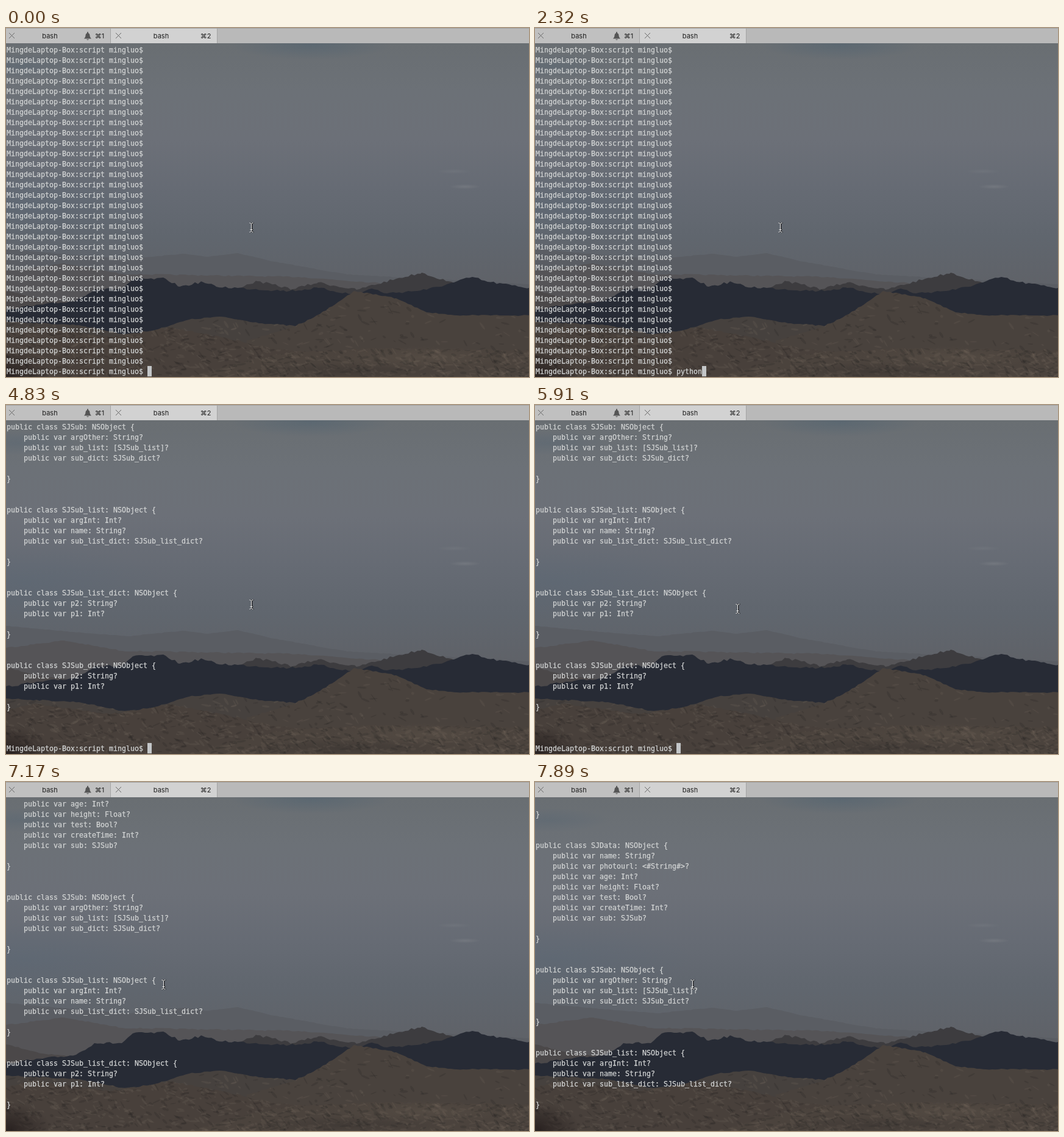
Write an HTML page with a canvas that moves like this. It is 858 px wide and 572 px high and loops after 8000 ms.

```html
<!DOCTYPE html>
<html lang="en">
<head>
<meta charset="utf-8">
<title>Terminal</title>
<style>
html, body { margin: 0; width: 100%; height: 100%; overflow: hidden; background: #666b72; }
#stage { position: relative; width: 858px; height: 572px; overflow: hidden; }
#stage > * { position: absolute; }
canvas { left: 0; top: 0; }
#text { margin: 0; left: 1px; top: 28px; color: #d2d4d4; white-space: pre;
  font: 11.63px/17px "DejaVu Sans Mono", monospace; -webkit-text-stroke: .25px #d2d4d4; }
#caret { width: 7px; height: 17px; background: #c3c6c8; }
#mouse { left: 0; top: 0; overflow: visible; fill: none; }
#bar { left: 0; top: 0; width: 858px; height: 25px; background: #b9b9b9; box-sizing: border-box;
  border-top: 1px solid #a2a2a2; }
.tab { position: absolute; top: 0; height: 24px; box-sizing: border-box; background: #c0c0c0;
  border-right: 1px solid #a4a4a4; color: #1c1c1c; font: 11px/24px Inter, "DejaVu Sans", sans-serif; }
.tab.on { background: #d2d2d2; }
.tab span { position: absolute; transform: translateX(-50%); white-space: pre; }
.tab svg { position: absolute; left: 0; top: 0; }
</style>
</head>
<body>
<div id="stage">
  <canvas id="scene" width="858" height="572"></canvas>
  <pre id="text"></pre>
  <div id="caret"></div>
  <div id="bar">
    <div class="tab" style="left:0;width:172px">
      <svg width="172" height="22"><path d="M5 7l9 9m0-9l-9 9" stroke="#6a6a6a"/>
      <path d="M128 16.5q2.5-2 2.5-5q0-4 3.5-4.5q3.5.5 3.5 4.5q0 3 2.5 5zM132 17.5h4q-2 2.5-4 0zM133 5.5h2v2h-2z" fill="#555"/></svg>
      <span style="left:72px">bash</span><span style="left:153.5px">⌘1</span>
    </div>
    <div class="tab on" style="left:172px;width:175px">
      <svg width="172" height="22"><path d="M8 7l9 9m0-9l-9 9" stroke="#6a6a6a"/></svg>
      <span style="left:82.5px">bash</span><span style="left:155.5px">⌘2</span>
    </div>
  </div>
  <svg id="mouse" width="1" height="1">
    <g id="beam">
      <path d="M-2-7.5q3 0 3 2V5.5q0 2-3 2M4-7.5q-3 0-3 2M4 7.5q-3 0-3-2M-1 3.5h4" stroke="#18191b" stroke-width="1.6"/>
      <path d="M-3-7.5q3 0 3 2V5.5q0 2-3 2M3-7.5q-3 0-3 2M3 7.5q-3 0-3-2M-2 3.5h4" stroke="#eee"/>
    </g>
  </svg>
</div>
<script>
const $ = id => document.getElementById(id);
const ctx = $('scene').getContext('2d');

let seed = 7;
const rnd = () => (seed = seed * 16807 % 2147483647) / 2147483647;

function sky() {
  const g = ctx.createLinearGradient(0, 24, 0, 420);
  ['#696e72', '#6c7177', '#6c7078', '#666b74', '#60666e', '#5f6268']
    .forEach((c, i, all) => g.addColorStop(i / (all.length - 1), c));
  ctx.fillStyle = g;
  ctx.fillRect(0, 24, 858, 548);
}

function glow(x, y, rx, ry, rgb, alpha) {
  ctx.save();
  ctx.translate(x, y);
  ctx.scale(rx, ry);
  const g = ctx.createRadialGradient(0, 0, 0, 0, 0, 1);
  g.addColorStop(0, `rgba(${rgb},${alpha})`);
  g.addColorStop(1, `rgba(${rgb},0)`);
  ctx.fillStyle = g;
  ctx.fillRect(-1, -1, 2, 2);
  ctx.restore();
}

// Filled ridge through a few "x,y" peaks and dips, roughened by noise, with rock specks
function ridge(points, color, rough, specks = 0) {
  const p = points.split(' ').map(s => s.split(',').map(Number));
  const top = Math.min(...p.map(q => q[1]));
  ctx.save();
  ctx.beginPath();
  ctx.moveTo(p[0][0], 572);
  p.forEach(([x, y], i) => {
    ctx.lineTo(x, y);
    const [nx, ny] = p[i + 1] || [x, y];
    for (let d = 5; d < nx - x; d += 5)
      ctx.lineTo(x + d, y + (ny - y) * d / (nx - x) + (rnd() - .5) * rough);
  });
  ctx.lineTo(p[p.length - 1][0], 572);
  ctx.fillStyle = color;
  ctx.fill();
  ctx.clip();
  for (let i = 0; i < specks; i++) {
    ctx.fillStyle = rnd() < .5 ? 'rgba(125,112,98,.16)' : 'rgba(28,26,28,.17)';
    ctx.beginPath();
    ctx.ellipse(rnd() * 858, top + rnd() * (572 - top), 2 + rnd() * 6, .7 + rnd() * 1.6, rnd() * 1.6 - .5, 0, 7);
    ctx.fill();
  }
  ctx.restore();
}

function landscape() {
  sky();
  glow(500, 28, 130, 24, '75,96,112', .45);
  glow(20, 62, 100, 20, '85,100,114', .4);
  glow(30, 290, 230, 60, '84,101,117', .3);
  glow(735, 235, 28, 4, '130,134,140', .25);
  glow(753, 260, 26, 4, '135,138,143', .4);
  ridge('0,362 110,372 200,379 290,370 330,375 380,369 440,383 560,404 858,420', '#5a5d63', 1);
  ridge('0,398 95,386 190,403 480,408 640,420', '#555457', 2);
  ridge('0,430 60,445 110,450', '#4b4849', 2);
  ridge('380,426 412,415 470,428 512,417 575,429 640,411 682,401 725,415 760,430', '#3d3c3f', 4);
  ridge('0,461 115,447 145,428 190,428 208,412 262,411 285,424 322,416 345,424 465,431 512,426 570,437 600,427 625,435 690,429 735,417 765,408 790,416 858,426', '#272b35', 4);
  ridge('0,481 120,487 190,501 230,499 300,478 350,473 420,484 520,492', '#46413e', 2, 500);
  ridge('395,512 465,492 500,477 540,453 572,431 640,443 690,466 740,471 858,471', '#49423d', 2, 500);
  ridge('0,500 50,490 170,507 270,491 350,506 440,526 600,545', '#48403b', 3, 1100);
  ridge('300,572 400,545 460,532 600,525 858,528', '#4b433d', 3, 900);
  glow(680, 540, 150, 18, '105,94,82', .25);
  glow(560, 562, 170, 14, '45,41,40', .35);
  glow(0, 572, 75, 48, '36,29,28', .9);
}

const prompt = 'MingdeLaptop-Box:script mingluo$ ';
const command = 'python Main.py ';
const cls = (name, ...vars) =>
  [`public class ${name}: NSObject {`, ...vars.map(v => `    public var ${v}?`), '', '}', '', ''];
const output = ['', '}', '', '',
  ...cls('SJData', 'name: String', 'photourl: <#String#>', 'age: Int', 'height: Float',
    'test: Bool', 'createTime: Int', 'sub: SJSub'),
  ...cls('SJSub', 'argOther: String', 'sub_list: [SJSub_list]', 'sub_dict: SJSub_dict'),
  ...cls('SJSub_list', 'argInt: Int', 'name: String', 'sub_list_dict: SJSub_list_dict'),
  ...cls('SJSub_list_dict', 'p2: String', 'p1: Int'),
  ...cls('SJSub_dict', 'p2: String', 'p1: Int'), '', prompt];

const rows = 32, tick = 180;
const complete = 4110, enter = 4650, print = 4830, scrollStart = 6630;
const keys = [1070, 1250, 1430, 1430, 2140, 2320, 3040, 3930];
const pointer = [[0, 402.5, 327], [5910, 332.5, 334], [6090, 259, 335], [6450, 258.5, 332]];

const typed = t => t < complete ? keys.filter(k => k <= t).length : command.length;

function scrolled(t) {
  const step = Math.floor((t - scrollStart) / tick);
  return step < 0 ? 0 : Math.min(16, Math.round(2 + 2.2 * step));
}

function screen(t) {
  if (t >= print) {
    const end = output.length - scrolled(t);
    return output.slice(end - rows, end);
  }
  const lines = Array(rows).fill(prompt);
  const line = prompt + command.slice(0, typed(t));
  if (t < enter) lines[rows - 1] = line;
  else lines.splice(rows - 2, 2, line, '');
  return lines;
}

let shown;
function frame(now) {
  const t = now % 8000;
  const lines = screen(t), text = lines.join('\n');
  if (text !== shown) $('text').textContent = shown = text;
  const caret = $('caret').style;
  caret.left = 1 + 7 * lines[rows - 1].length + 'px';
  caret.top = 27 + 17 * (rows - 1) + 'px';
  caret.display = t < scrollStart ? 'block' : 'none';
  const [, x, y] = pointer.filter(p => p[0] <= t).pop();
  $('beam').setAttribute('transform', `translate(${x} ${y})`);
  requestAnimationFrame(frame);
}

landscape();
frame(0);
</script>
</body>
</html>
```
